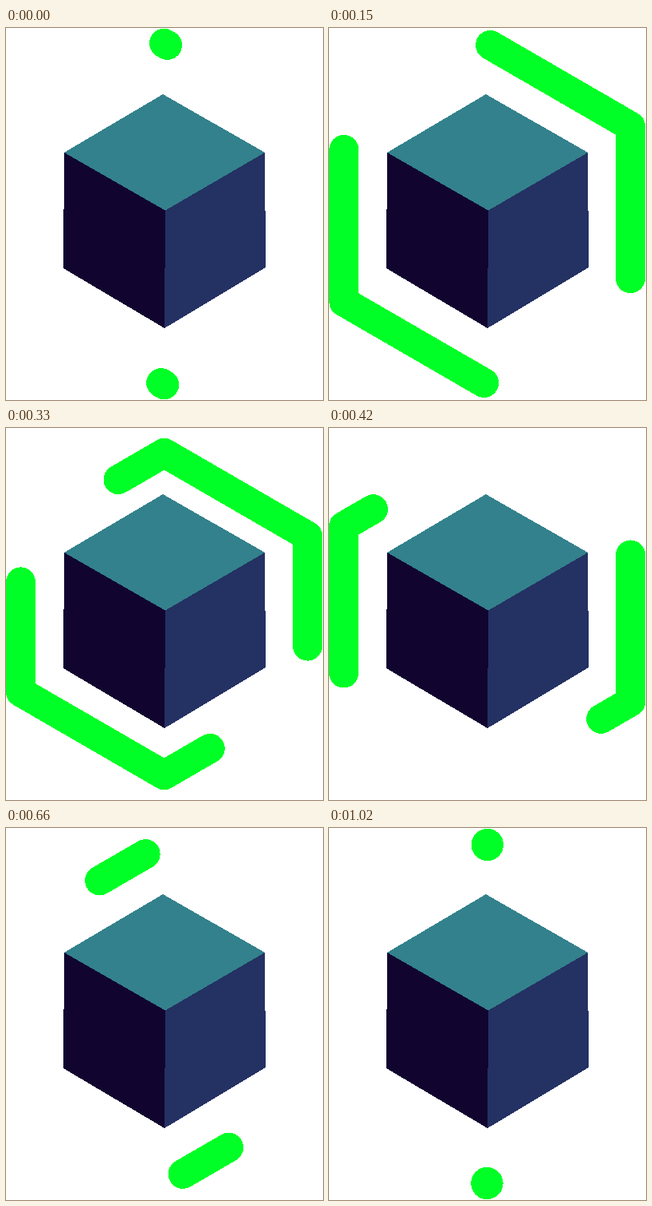
Animation, 398 px wide and 466 px high, one loop 1.47 s. Source, as an HTML page:

```html
<!DOCTYPE html>
<html lang="en">
<head>
<meta charset="utf-8">
<title>Cube loader</title>
<style>
  html, body { margin: 0; width: 100%; height: 100%; overflow: hidden; background: #fff; }
  svg { display: block; width: 398px; height: 466px; shape-rendering: crispEdges; }
  .trail { fill: none; stroke: #00ff26; stroke-width: 37; stroke-linecap: round; stroke-linejoin: round; }
  .dot { fill: #00ff26; }
</style>
</head>
<body>
<svg viewBox="0 0 398 466">
  <polygon fill="#110530" points="73,156 200,228.5 199,376 72,301"/>
  <polygon fill="#243163" points="200,228.5 325,156 326,300 199,376"/>
  <polygon fill="#33818c" points="197,83 325,156 200,228.5 73,156"/>
  <defs>
    <g id="half">
      <path id="trail" class="trail" pathLength="1000"/>
      <circle id="dot" class="dot" cx="198.8" cy="21" r="20.2"/>
    </g>
  </defs>
  <use href="#half"/>
  <use href="#half" transform="rotate(180 198.6 233)"/>
</svg>
<script>
  const LOOP = 1470, STEP = 30, RUN = 900, END = 1020;
  const HEAD_START = -30, TAIL_START = 120;
  const trail = document.getElementById('trail');
  const dot = document.getElementById('dot');

  // Regular hexagon, clockwise from its top corner
  const side = 207.8, cx = 198.5, cy = 226.9;
  const corners = Array.from({ length: 6 }, (_, i) => {
    const a = (i * 60 - 90) * Math.PI / 180;
    return `${(cx + side * Math.cos(a)).toFixed(2)},${(cy + side * Math.sin(a)).toFixed(2)}`;
  });
  trail.setAttribute('d', `M${corners.join('L')}Z`);

  // cubic-bezier(1/3, 0, 0, 1), solved by bisection
  function ease(x) {
    if (x <= 0) return 0;
    if (x >= 1) return 1;
    let lo = 0, hi = 1;
    for (let i = 0; i < 30; i++) {
      const u = (lo + hi) / 2;
      if ((1 - u) ** 2 * u + u ** 3 < x) lo = u; else hi = u;
    }
    return lo * lo * (3 - 2 * lo);
  }

  function draw(time) {
    const t = Math.floor((time % LOOP) / STEP) * STEP;
    const done = t >= END;
    const head = 1000 * ease((t - HEAD_START) / RUN);
    const tail = 1000 * ease((t - TAIL_START) / RUN);
    trail.style.strokeDasharray = `${head - tail} 2000`;
    trail.style.strokeDashoffset = -tail;
    trail.style.visibility = done ? 'hidden' : 'visible';
    dot.style.visibility = done ? 'visible' : 'hidden';
  }

  const start = performance.now();
  function tick() {
    draw(performance.now() - start);
    requestAnimationFrame(tick);
  }
  tick();
</script>
</body>
</html>
```
